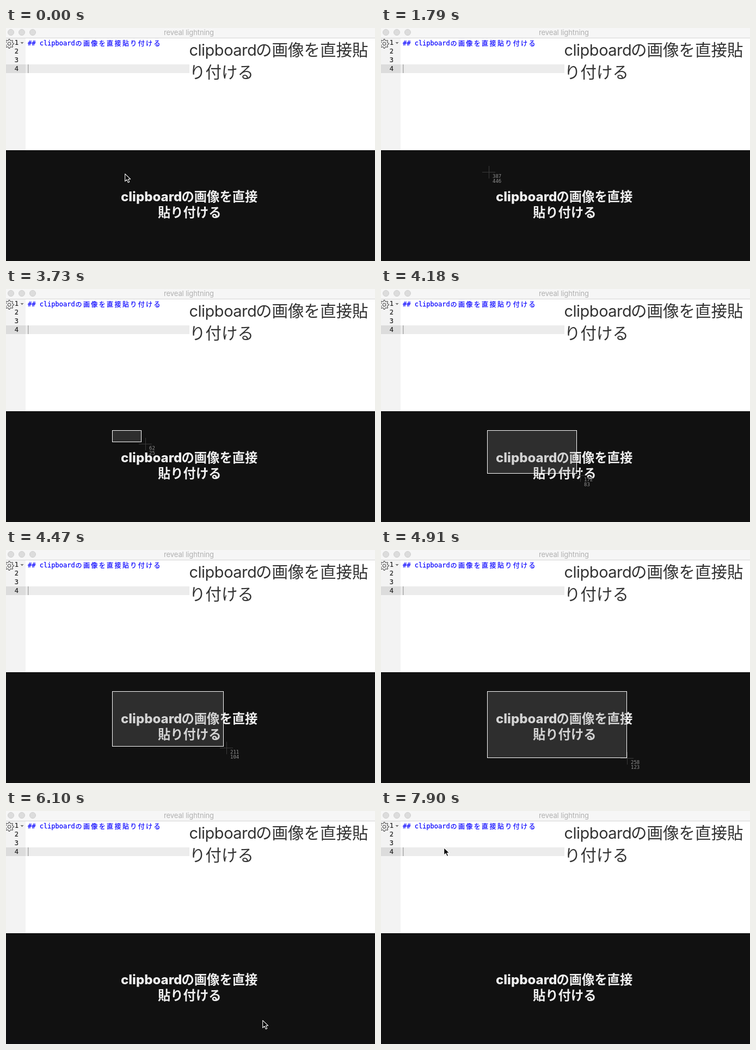
An HTML page that plays this animation: 678x429 px, repeating every 8 s.

```html
<!DOCTYPE html>
<html lang="ja">
<head>
<meta charset="utf-8">
<title>reveal lightning</title>
<style>
  html, body { margin: 0; width: 100%; height: 100%; overflow: hidden; background: #111; }
  svg { display: block; width: 678px; height: 429px; }
  text { white-space: pre; }
  .title { font: 13px Inter, sans-serif; letter-spacing: -.1px; fill: #b0b0b0; text-anchor: middle; }
  .mono { font: 12px "DejaVu Sans Mono", monospace; }
  .number { fill: #222; stroke: #222; stroke-width: .2; text-anchor: end; }
  .code { fill: #0c07ff; stroke: #0c07ff; stroke-width: .25; }
  .cjk { font-family: "Noto Sans CJK JP", "Noto Sans CJK", sans-serif; }
  .cell { font-size: 12px; letter-spacing: 2.4px; }
  .preview { font-size: 29.5px; fill: #333; }
  .preview.latin { font-size: 29px; letter-spacing: -.5px; }
  .slide { font-weight: 700; font-size: 23.3px; fill: #f0f0f0; }
  .slide.latin { font-weight: 800; font-size: 24px; }
  .latin { font-family: Inter, sans-serif; }
  .label { font: 9px "DejaVu Sans Mono", monospace; fill: #929292; stroke: #111; paint-order: stroke; }
</style>
</head>
<body>
<svg viewBox="0 0 678 429" lang="ja">
  <!-- window and editor -->
  <rect width="678" height="225" fill="#fff"/>
  <rect width="678" height="18" fill="#f6f6f6"/>
  <rect y="18" width="678" height="1" fill="#d4d4d4"/>
  <g fill="#dcdcdc" stroke="#d0d0d0">
    <circle cx="9" cy="8" r="5.5"/><circle cx="29" cy="8" r="5.5"/><circle cx="49" cy="8" r="5.5"/>
  </g>
  <text class="title" x="336" y="13">reveal lightning</text>
  <rect y="19" width="36" height="206" fill="#f3f3f3"/>
  <rect y="67" width="36" height="16" fill="#dcdcdc"/>
  <rect x="36" y="67" width="301" height="16" fill="#ececec"/>
  <rect x="40" y="67" width="1.5" height="16" fill="#a8a8a8"/>
  <g id="numbers"></g>
  <path d="M26.5 26h6l-3 3.5z" fill="#777"/>
  <g fill="none" stroke="#555" stroke-width="1.1" stroke-linejoin="round">
    <path id="gear"/><circle cx="6" cy="29" r="2.8"/>
  </g>
  <text class="mono code" x="40" y="32">## clipboard</text>
  <text class="cjk cell code" x="127.5" y="32.5">の画像を直接貼り付ける</text>

  <!-- preview -->
  <text class="preview latin" x="336.5" y="51">clipboard</text>
  <text class="preview cjk" x="459" y="51">の画像を直接貼</text>
  <text class="preview cjk" x="337" y="92">り付ける</text>

  <!-- slide -->
  <rect y="225" width="678" height="204" fill="#111"/>
  <text class="slide latin" x="211" y="319">clipboard</text>
  <text class="slide cjk" x="322.5" y="319">の画像を直接</text>
  <text class="slide cjk" x="279" y="347.5">貼り付ける</text>

  <!-- screen capture -->
  <rect id="selection" x="195.5" y="260.5" fill="#808080" fill-opacity=".26" stroke="#fff"/>
  <rect id="dot" x="195" y="260" width="1" height="1" fill="#fff"/>
  <g id="cross">
    <path d="M-12 -.5H12M.5 -12V11" stroke="#3a3a3a" fill="none"/>
    <text class="label" id="labelX" x="7" y="10"></text>
    <text class="label" id="labelY" x="7" y="19"></text>
  </g>
  <path id="arrow" d="M.7 .6V14.2L4 11.1L6.3 16.4L8.7 15.4L6.4 10.2H10.6Z"
    fill="#000" stroke="#fff" stroke-width="1.1" stroke-linejoin="round"/>
</svg>
<script>
const LOOP = 8000;
const $ = id => document.getElementById(id);

// time, mode, x, y, then how far the selection corner trails the pointer
const STEPS = [
  [0, 'arrow', 218, 268],
  [290, 'aim', 220, 271],
  [740, 'aim', 220, 271],
  [1790, 'aim', 198, 266],
  [1940, 'aim', 195, 261],
  [2390, 'press', 195, 261],
  [3140, 'drag', 198, 263, 1, 1],
  [3290, 'drag', 206, 267, 3, 2],
  [3440, 'drag', 219, 273, 5, 3],
  [3590, 'drag', 238, 280, 7, 4],
  [3730, 'drag', 256, 286, 7, 4],
  [3880, 'drag', 293, 306, 8, 5],
  [4030, 'drag', 333, 327, 8, 5],
  [4180, 'drag', 366, 344, 6, 4],
  [4320, 'drag', 386, 355, 5, 3],
  [4470, 'drag', 405, 365, 5, 3],
  [4620, 'drag', 424, 373, 4, 2],
  [4760, 'drag', 440, 379, 2, 1],
  [4910, 'drag', 452, 384, 0, 1],
  [5050, 'drag', 460, 385, 0, 0],
  [5200, 'drag', 467, 386, 0, 0],
  [5350, 'drag', 471, 386, 0, 0],
  [5500, 'drag', 481, 386, 0, 0],
  [5950, 'aim', 481, 386],
  [6100, 'arrow', 471, 385],
  [7150, 'arrow', 456, 371],
  [7300, 'arrow', 388, 308],
  [7450, 'arrow', 292, 222],
  [7600, 'arrow', 205, 145],
  [7750, 'arrow', 142, 90],
  [7900, 'arrow', 115, 67],
];

for (let i = 0; i < 4; i++) {
  $('numbers').innerHTML += `<text class="mono number" x="23" y="${31 + 16 * i}">${i + 1}</text>`;
}

// eight teeth, four corners each
const corners = Array.from({ length: 32 }, (_, i) => {
  const radius = i % 4 < 2 ? 8.4 : 6.2;
  const angle = (i - .5) * Math.PI / 16;
  return [6 + radius * Math.cos(angle), 29 + radius * Math.sin(angle)].map(n => n.toFixed(2));
});
$('gear').setAttribute('d', 'M' + corners.join('L') + 'Z');

const show = (id, on) => $(id).setAttribute('visibility', on ? 'visible' : 'hidden');
const move = (id, x, y) => $(id).setAttribute('transform', `translate(${x} ${y})`);

function draw([, mode, x, y, trailX = 0, trailY = 0]) {
  const drag = mode === 'drag';
  show('arrow', mode === 'arrow');
  show('cross', mode !== 'arrow');
  show('dot', mode === 'press');
  show('selection', drag);
  move('arrow', x, y);
  move('cross', x, y);
  $('labelX').textContent = drag ? x - 194 : x + 189;
  $('labelY').textContent = drag ? y - 261 : y + 180;
  if (drag) {
    $('selection').setAttribute('width', Math.max(0, x - trailX - 196));
    $('selection').setAttribute('height', Math.max(0, y - trailY - 261));
  }
}

const start = performance.now();
let current;
function tick() {
  const time = (performance.now() - start) % LOOP;
  const step = STEPS.findLast(s => s[0] <= time);
  if (step !== current) draw(current = step);
  requestAnimationFrame(tick);
}
tick();
</script>
</body>
</html>
```
